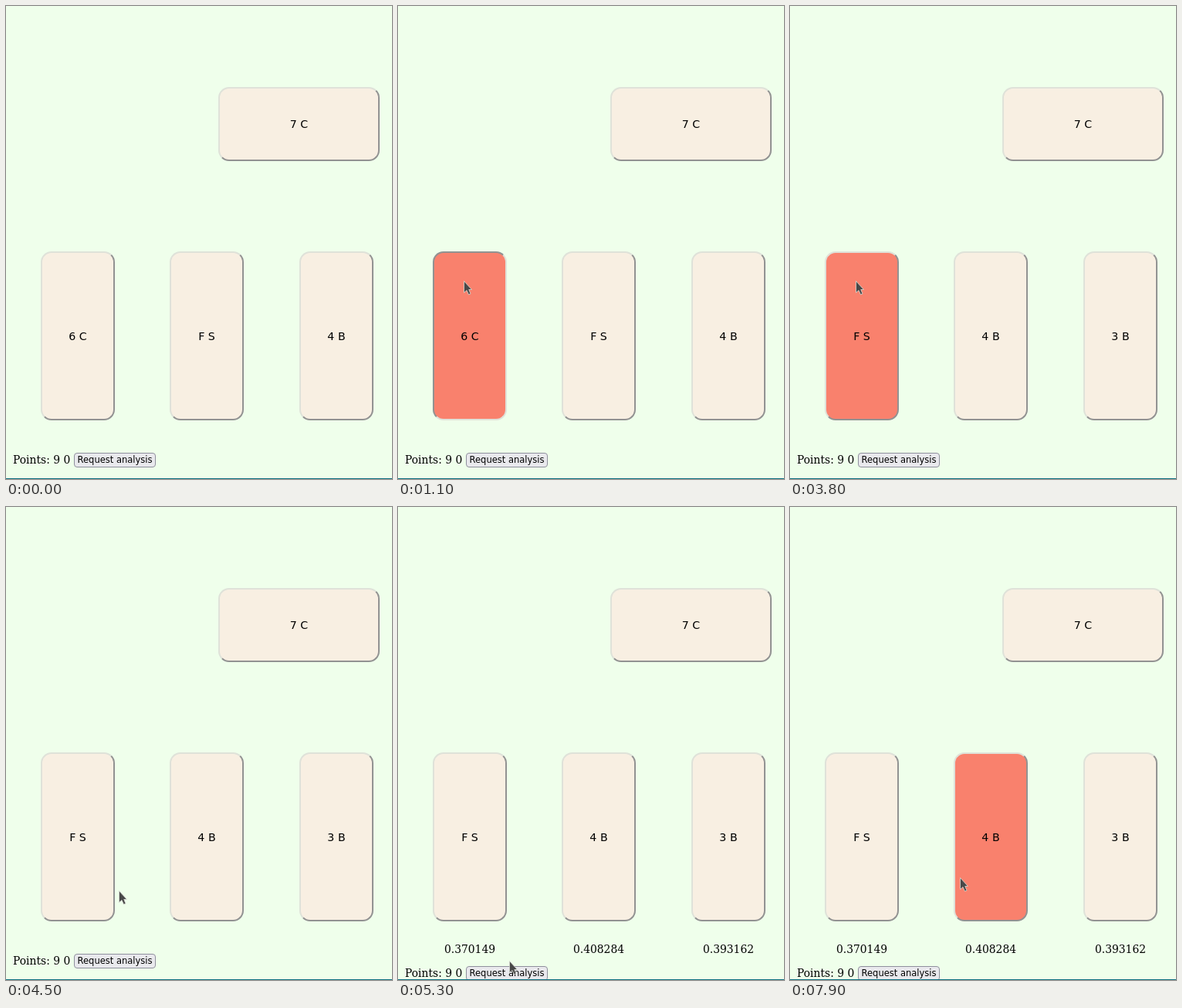
Write an HTML page that moves like this. It is 500 by 613 pixels and loops after 8000 ms.

```html
<!DOCTYPE html>
<html lang="en">
<head>
<meta charset="utf-8">
<title>Card game</title>
<style>
html, body { margin: 0; width: 100%; height: 100%; overflow: hidden; background: #efffeb; }
#stage { position: relative; width: 500px; height: 613px; overflow: hidden; color: #000; }
#stage > * { position: absolute; box-sizing: border-box; white-space: pre; }
.card {
  display: flex; align-items: center; justify-content: center;
  border: 2px solid; border-color: #dfe2d9 #929292 #929292 #dfe2d9;
  border-radius: 14px; background: #f8efe2;
  font: 14.2px "DejaVu Sans", sans-serif;
}
.card.hover { background: #f9816d; }
.card.pressed { border-color: #929292 #dfe2d9 #dfe2d9 #929292; }
.odds, #points { font: 13.87px/20px "DejaVu Serif", serif; }
.odds { top: 563px; width: 96px; text-align: center; }
#points { left: 9px; }
#button {
  left: 88px; width: 106px; height: 19px;
  border: 1px solid #8f8f9d; border-radius: 4px; background: #e9e9ed;
  font: 11.5px/17px "DejaVu Sans", sans-serif; text-align: center;
}
#button.hover { background: #d0d0d7; }
#button.pressed { background: #b1b1b9; }
#edge { left: 0; top: 612px; width: 500px; height: 1px; background: #0b6f80; }
#cursor { left: 0; top: 0; overflow: visible; }
</style>
</head>
<body>
<div id="stage">
  <div id="points">Points: 9 0</div>
  <div id="button">Request analysis</div>
  <div id="edge"></div>
</div>
<script>
const LOOP = 8000;
const PLAYED = 1300, ANSWERED = 1800, NEW_HAND = 3800, ANALYSED = 5200;
const HAND_X = [45, 212, 380];
const stage = document.getElementById('stage');
const points = document.getElementById('points');
const button = document.getElementById('button');

function add(className, text, box) {
  const el = document.createElement('div');
  el.className = className;
  el.textContent = text;
  const [left, top, width, height] = box.map(v => v + 'px');
  Object.assign(el.style, { left, top, width, height });
  stage.append(el);
  return el;
}

add('card', '7 C', [275, 105, 209, 96]);
const played = add('card', '6 C', [23, 43, 92, 220]);
const answer = add('card', '2 S', [142.5, 43, 91.5, 220]);
const hand = HAND_X.map(x => add('card', '', [x, 318, 96, 219]));
const odds = ['0.370149', '0.408284', '0.393162'].map((text, i) => add('odds', text, [HAND_X[i]]));

stage.insertAdjacentHTML('beforeend', `<svg id="cursor" width="14" height="22">
  <path d="M.5 .5V15.5L4 12.5L6.5 18L9 17L6.8 11.5H10.5Z" fill="#484848" stroke="#d8dcd5" stroke-width=".8"/></svg>`);
const cursor = document.getElementById('cursor');

// Pointer stops: time, x, y; each is held until the next.
const stops = [
  [700, 39, 396], [800, 74, 366], [900, 85, 356],
  [4300, 96, 386], [4400, 124, 448], [4500, 146, 497], [4600, 152, 536],
  [4700, 151, 562], [4800, 148, 578], [4900, 145, 586], [5000, 144, 588],
  [7200, 142, 588], [7400, 143, 587],
  [7600, 152, 572], [7700, 176, 538], [7800, 205, 502], [7900, 220, 480]
];

const show = (el, visible) => { el.style.visibility = visible ? 'visible' : 'hidden'; };
const between = (t, from, to) => t >= from && t < to;
const inside = (p, x, y, w, h) => !!p && between(p[1], x, x + w) && between(p[2], y, y + h);

function render(t) {
  const pointer = stops.findLast(stop => stop[0] <= t);
  show(cursor, pointer);
  if (pointer) cursor.style.transform = `translate(${pointer[1]}px, ${pointer[2]}px)`;

  const labels = t < NEW_HAND ? ['6 C', 'F S', '4 B'] : ['F S', '4 B', '3 B'];
  hand.forEach((card, i) => {
    card.textContent = labels[i];
    card.classList.toggle('hover', inside(pointer, HAND_X[i], 318, 96, 219));
  });
  hand[0].classList.toggle('pressed', between(t, 1100, PLAYED));
  show(hand[0], !between(t, PLAYED, NEW_HAND));
  show(played, between(t, PLAYED, NEW_HAND));
  show(answer, between(t, ANSWERED, NEW_HAND));

  const analysed = t >= ANALYSED;
  odds.forEach(el => show(el, analysed));
  const top = analysed ? 595 : 579;
  points.style.top = top - 1 + 'px';
  button.style.top = top + 'px';
  button.classList.toggle('hover', inside(pointer, 88, top, 106, 19));
  button.classList.toggle('pressed', between(t, 5100, ANALYSED));
}

function tick() {
  render(performance.now() % LOOP);
  requestAnimationFrame(tick);
}
tick();
</script>
</body>
</html>
```
